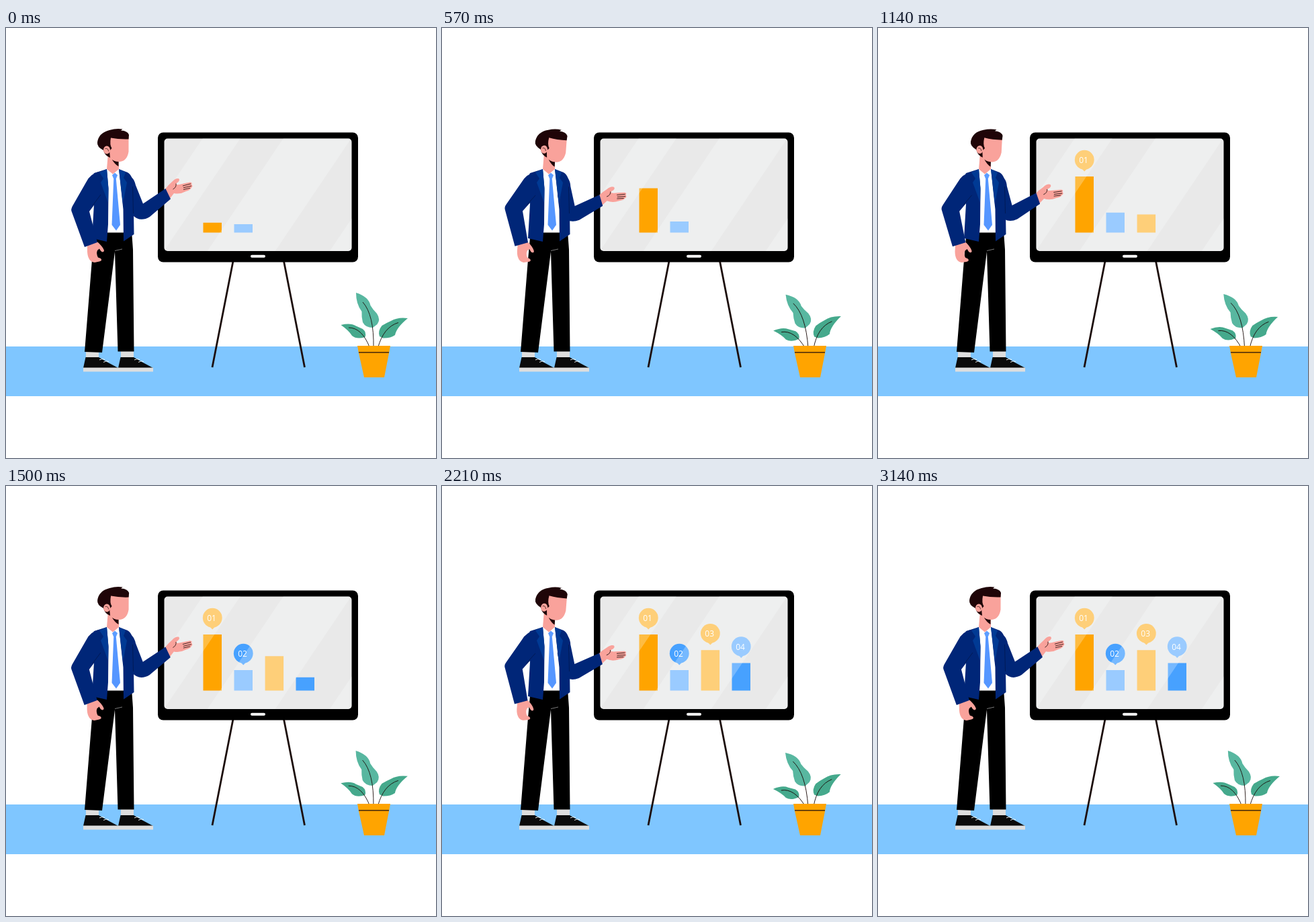
Recreate the animation shown at these times as an HTML page with a canvas. Size 640 by 640 pixels, loop 3210 ms.

```html
<!DOCTYPE html>
<html lang="en">
<head>
<meta charset="utf-8">
<title>Presentation</title>
<style>
html, body { margin: 0; width: 100%; height: 100%; overflow: hidden; background: #fff; }
canvas { display: block; width: 640px; height: 640px; }
</style>
</head>
<body>
<canvas id="stage" width="640" height="640"></canvas>
<script>
const ctx = document.getElementById('stage').getContext('2d');
const LOOP = 3210, STEP = LOOP / 45, SWING = LOOP / 4;
const SKIN = '#f9a29b', SUIT = '#002678', LAPEL = '#003a94', HAIR = '#1f0508';
const ORANGE = '#ffa400', PEACH = '#ffbe4a', BLUE = '#47a1ff', SKY = '#78b9ff';
const LIGHT = '#dedede', INK = '#1c0d0b';
const BASE_Y = 304.5, BAR_W = 27.5, MIN_H = 12.4, GROW = 1000;

const bars = [
  { x: 293.5, h: 83.5, color: ORANGE, tag: PEACH, start: -106, shown: 0 },
  { x: 339.5, h: 30.5, color: SKY, tag: BLUE, start: 265, shown: 0 },
  { x: 385.6, h: 60.3, color: PEACH, tag: PEACH, start: 775, shown: 775 },
  { x: 431.5, h: 41, color: BLUE, tag: SKY, start: 1165, shown: 1165 }
];

const clamp = v => Math.max(0, Math.min(1, v));
const ease = v => { v = clamp(v); return v * v * (3 - 2 * v); };

function fill(d, color) {
  ctx.fillStyle = color;
  ctx.fill(new Path2D(d));
}

function line(d, color, width = 0.9) {
  ctx.strokeStyle = color;
  ctx.lineWidth = width;
  ctx.stroke(new Path2D(d));
}

function box(x, y, w, h, r, color) {
  ctx.fillStyle = color;
  ctx.beginPath();
  ctx.roundRect(x, y, w, h, r);
  ctx.fill();
}

function turn(x, y, angle, draw) {
  ctx.save();
  ctx.translate(x, y);
  ctx.rotate(angle);
  ctx.translate(-x, -y);
  draw();
  ctx.restore();
}

function drawBar(bar, i, t) {
  if (t < bar.shown) return;
  const h = MIN_H + (bar.h - MIN_H) * ease((t - bar.start) / GROW);
  box(bar.x, BASE_Y - h, BAR_W, h, 0, bar.color);

  const alpha = clamp((t - bar.start - 900) / 140);
  if (!alpha) return;
  const cx = bar.x + BAR_W / 2, cy = BASE_Y - bar.h - 24.8;
  ctx.save();
  ctx.globalAlpha = alpha;
  ctx.fillStyle = bar.tag;
  ctx.beginPath();
  ctx.arc(cx, cy, 14.4, 0, Math.PI * 2);
  ctx.fill();
  fill(`M${cx - 4} ${cy + 13}L${cx} ${cy + 17.2}L${cx + 4} ${cy + 13}Z`, bar.tag);
  ctx.fillStyle = '#fff';
  ctx.font = '12px "Open Sans", "Noto Sans", sans-serif';
  ctx.textAlign = 'center';
  ctx.fillText('0' + (i + 1), cx - 1.2, cy + 4.8);
  ctx.restore();
}

function drawBoard(t) {
  line('M338 347L307 505M413.5 347L444.5 505', INK, 2.8);
  box(226, 155.5, 298, 193, 8, '#000');
  box(364, 337.7, 22, 4, 2, '#fff');
  ctx.save();
  ctx.beginPath();
  ctx.roundRect(235.5, 164.5, 279, 167.5, 5);
  ctx.clip();
  box(235, 164, 280, 169, 0, '#e9e9e9');
  bars.forEach((bar, i) => drawBar(bar, i, t));
  fill('M293 164H349L235 332H179ZM413 164H514L400 333H299ZM515 283V333H481Z', 'rgba(252,255,255,.26)');
  ctx.restore();
}

function drawPlant(s) {
  turn(549, 480, -0.192 * s, () => {
    fill('M498.5 442Q513 438.5 521 443.5L531 448Q537 453 534.5 460Q522 464 515 458Q510 450 498.5 442Z', '#45a98c');
    line('M510 446Q530 446 541.5 476', INK);
  });
  turn(560, 482, -0.097 * s, () => {
    fill('M598 432Q583 430 573 436Q566 439 559.5 443Q553 451 556 459L561 461.5Q572 462 579 457Q581 446 598 432Z', '#45a98c');
    line('M584 438.5Q562 445 553.5 476', INK);
  });
  turn(547, 498, -0.112 * s, () => {
    fill('M521 394Q540 400 542.5 413Q546 419 552 425Q558 434 552.5 441L546 446Q535 446 531 438Q529 430 529.5 422Q521 411 521 394Z', '#58b7a0');
    line('M531 408Q548 427 547 476', INK);
  });
  fill('M523 473H572L570 484L563 520H533L525 484Z', ORANGE);
  line('M525 482.8H570', INK, 1.2);
}

function drawShoe(x) {
  ctx.save();
  ctx.translate(x, 0);
  fill('M4 481H23V491H4Z', LIGHT);
  fill('M3.5 490H23L37 498L52 506H0Z', '#0b0b0b');
  fill('M0 505.5H52V511.5H0Z', LIGHT);
  line('M24 494Q28 491.500 32 493.500M30 497.500Q34 494.500 38 496.500', '#fff');
  ctx.restore();
}

function drawLegs() {
  drawShoe(115);
  drawShoe(167);
  fill('M134 302H187L189 330L190.5 481.5H166.500L162 333L143 483L117 482L128 345L131 312Z', '#000');
  line('M162 331.500L173 329', '#999', 0.8);
}

function drawRightArm() {
  fill('M236 241Q241 234 247 229Q252 223 257 224Q260 227 254 231Q252 234 258 233Q267 231 274 229.500Q278 230 276 233Q279 235 276 237.500Q275 241 268 243Q259 248 250 246L243 255Z', SKIN);
  line('M263 235L275 231.800M264 237.800L276 235M264 240.500L274 238.200M253 231.500Q254 237 248.500 240', INK, 0.8);
  fill('M176 218Q190 219 193 234L204 261.500L237.500 239L245 254.500L214 281Q199 290 188 278L176 250Z', SUIT);
}

function drawLeftArm() {
  fill('M121 322V333Q122 348 132 349L139 347.500Q144 346 141 343L137 341.500Q134 336 136 331L139 328.500Q143 336 146 332Q146 328 138 320L134 317Z', SKIN);
  fill('M138 214Q125 217 119 230L99 265Q96 270 98 274L117 326L136 319L124 273L142 249Z', SUIT);
  line('M129 264L141 248', '#001648', 0.7);
}

function drawTorso() {
  fill('M150 209L159 214L168 209L176 304.500H151Z', '#fff');
  fill('M152 186L150 210L159 217.500L168 210V194Z', SKIN);
  fill('M158 219L162 215.500L166 219L164 224H160Z', '#5c9dff');
  fill('M160.300 223.500H163.700L170 293L164 301.500L157.500 293Z', '#5596ff');
  fill('M150 210L131 216L126 226L131 262L128 313L150 318L152 292L152.500 240Z', SUIT);
  fill('M168 210L181 215Q190 220 189.500 240L190.500 307L175 317.500L174.500 270Z', SUIT);
  fill('M150 210L139 215L145 224L141 230L152 260L152.500 238Z', LAPEL);
  fill('M168 210L178 215L175 223L180 230L174 262Z', LAPEL);
  line('M188.500 236L189.500 276', '#001648', 0.7);
}

function drawHead() {
  fill('M158 194L167.500 196V206Q162 203 158 196Z', HAIR);
  fill('M156 162H182.500V184Q180 199 168 199Q160 199 156 194L152 191V178Z', SKIN);
  fill('M155 193Q147 190 145 182Q135 177 136 170Q138 156 154 152Q164 149 173.500 150.500L171 152.500Q181 153 183 159L182.500 165.500Q168 166 156 163.500Q154 174 157.500 179L154 183Z', HAIR);
  ctx.fillStyle = SKIN;
  ctx.beginPath();
  ctx.ellipse(150, 181.5, 5, 6, 0, 0, Math.PI * 2);
  ctx.fill();
  line('M147.500 179.500Q152 178.500 152.500 183.500', INK, 0.7);
}

function drawMan(s) {
  drawLegs();
  turn(180, 225, 0.2 * s, drawRightArm);
  drawTorso();
  turn(128, 226, 0.104 * s, drawLeftArm);
  turn(160, 208, 0.09 * s, drawHead);
}

function render(t) {
  const p = (t + STEP / 4) / SWING % 2;
  const sway = ease(p < 1 ? p : 2 - p);
  ctx.clearRect(0, 0, 640, 640);
  box(0, 474, 640, 74, 0, '#7fc6ff');
  drawBoard(t);
  drawPlant(sway);
  drawMan(sway);
}

// The motion advances in 45 even steps per loop.
const began = performance.now();
function tick() {
  const t = (performance.now() - began) % LOOP;
  render(Math.floor((t + 3) / STEP) % 45 * STEP);
  requestAnimationFrame(tick);
}
tick();
</script>
</body>
</html>
```
